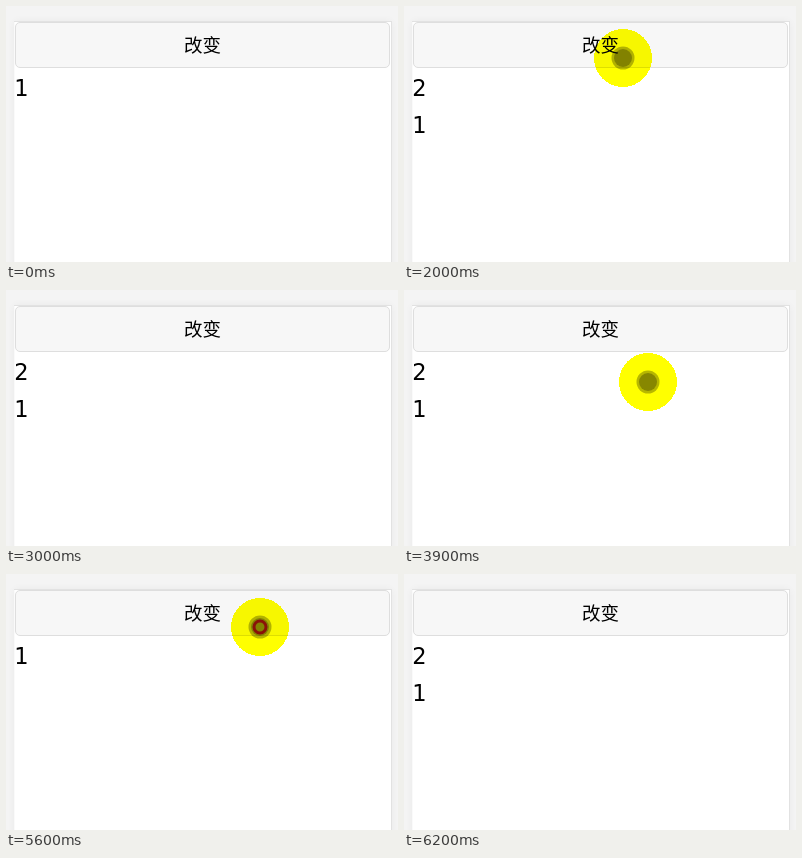
Recreate the animation shown at these times as an HTML page. Size 392 by 256 pixels, loop 7700 ms.

```html
<!DOCTYPE html>
<html lang="zh-CN">
<head>
<meta charset="utf-8">
<title>改变</title>
<style>
  html, body { margin: 0; width: 100%; height: 100%; overflow: hidden; background: #f3f3f3; }
  svg { display: block; width: 100vw; height: 100vh; }
  text { fill: #000; }
  .label {
    font: 300 18.5px "Noto Sans CJK SC Light", "Noto Sans CJK SC", "Noto Sans CJK", sans-serif;
    text-anchor: middle;
  }
  .item { font: 22.5px "DejaVu Sans", sans-serif; }
  .halo { fill: #ff0; mix-blend-mode: multiply; shape-rendering: crispEdges; }
</style>
</head>
<body>
<svg viewBox="0 0 392 256">
  <defs>
    <filter id="soft" x="-10%" y="-10%" width="120%" height="120%">
      <feGaussianBlur stdDeviation="4"/>
    </filter>
  </defs>
  <rect width="392" height="256" fill="#f4f4f4"/>
  <rect x="9" y="16" width="376" height="270" fill="#000" opacity=".06" filter="url(#soft)"/>
  <rect x="8.5" y="15.5" width="377" height="270" fill="#fff" stroke="#e2e2e2"/>
  <rect x="8" y="16" width="1" height="240" fill="#fafafa"/>
  <g id="page">
    <rect x="9.5" y="16.5" width="374" height="45" rx="4.5" fill="#f7f7f7" stroke="#dedede"/>
    <text class="label" x="196.5" y="46">改变</text>
    <text class="item" id="first" x="8.2" y="90"></text>
    <text class="item" id="second" x="8.2" y="127"></text>
  </g>
  <g id="pointer">
    <g id="touch" fill="#111">
      <circle r="11.5" opacity=".3"/>
      <circle r="9" opacity=".29"/>
    </g>
    <circle class="halo" r="29"/>
    <circle id="ring" fill="none" stroke="#8a1208" stroke-width="3"/>
    <path id="arrow" d="M.5 .5V16.5L4.2 13L6.8 18.8L9.3 17.7L6.8 12H12Z" fill="#fff" stroke="#000"/>
  </g>
</svg>
<script>
const LOOP = 7700, STEP = 100;
const $ = id => document.getElementById(id);
const show = (el, on) => el.setAttribute("visibility", on ? "inherit" : "hidden");
const within = (t, a, b) => t >= a && t < b;
const ramp = (t, a, b) => Math.min(1, Math.max(0, (t - a) / (b - a)));
const hop = (t, a, b) => Math.sin(Math.PI * ramp(t, a, b));

// Enter from above, drift while clicking, swing away to the left.
function firstVisit(t) {
  const enter = 1 - ramp(t, 100, 300);
  const drift = ramp(t, 1500, 1800);
  const swing = hop(t, 2500, 2800);
  const leave = ramp(t, 2600, 2900);
  return [
    213 - 2 * enter + 6 * drift + 9 * swing - 29 * leave,
    56 - 8 * enter - 4 * drift - 8 * swing + 15 * leave
  ];
}

// Enter from below, nudge onto the button, speed off to the lower right.
function secondVisit(t) {
  const enter = 1 - ramp(t, 3900, 4200);
  const nudge = hop(t, 4900, 5300);
  const lift = ramp(t, 5000, 5300);
  const leave = ramp(t, 5800, 6100) ** 1.6;
  return [
    254 - 10 * enter + 5 * nudge + 84 * leave,
    59 + 33 * enter + 6 * nudge - 6 * lift + 169 * leave
  ];
}

const visits = [
  { from: 100, to: 3000, click: 1700, at: firstVisit },
  { from: 3900, to: 6200, click: 5600, at: secondVisit }
];
const reload = { from: 4200, to: 4600 };
const CLICK = 200;

function draw(time) {
  // The screen is sampled ten times a second.
  const t = Math.floor((time % LOOP) / STEP) * STEP;
  const loading = within(t, reload.from, reload.to);
  const start = t < reload.from ? 0 : 1;
  const added = t >= visits[start].click + CLICK;
  show($("page"), !loading);
  $("first").textContent = added ? "2" : "1";
  $("second").textContent = added ? "1" : "";

  const visit = visits.find(v => within(t, v.from, v.to));
  show($("pointer"), visit);
  if (!visit) return;
  $("pointer").setAttribute("transform", `translate(${visit.at(t)})`);
  show($("touch"), !loading);
  show($("arrow"), loading);

  const age = t - visit.click;
  const clicking = within(age, 0, CLICK);
  show($("ring"), clicking);
  if (clicking) $("ring").setAttribute("r", 6 + age / 25);
}

function tick(now) {
  draw(now);
  requestAnimationFrame(tick);
}
draw(0);
requestAnimationFrame(tick);
</script>
</body>
</html>
```
